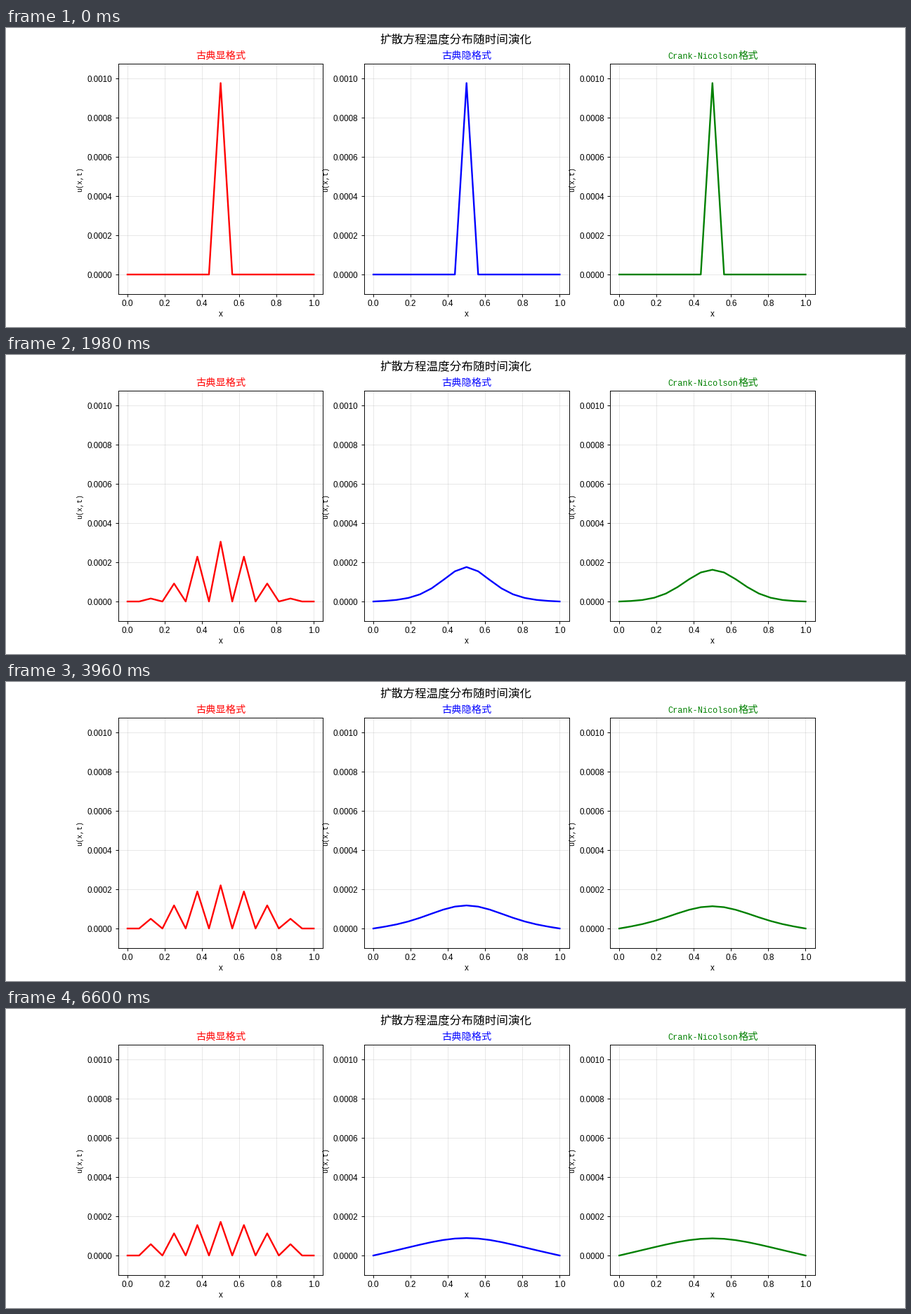
Animation, 1280 px wide and 427 px high, one loop 6930 ms. Source, as a matplotlib script:

```python
import numpy as np
import matplotlib.pyplot as plt
from matplotlib.animation import FuncAnimation

W, H, DPI = 1280, 427, 128
PT = 2 / 3                 # layout is designed for a 15 inch wide figure
STEPS, INTERVAL = 21, 330
N, R = 16, 0.5             # grid cells and mesh ratio
PEAK = 1 / 1024
CJK, SANS, MONO = "Noto Sans CJK JP", "Liberation Sans", "Liberation Mono"

plt.rcParams.update({
    "font.family": SANS,
    "axes.linewidth": 0.8 * PT,
    "grid.linewidth": 0.8 * PT,
    "xtick.labelsize": 10 * PT,
    "ytick.labelsize": 9.8 * PT,
})


def solve(theta):
    """Theta scheme for u_t = u_xx with zero boundary values."""
    m = N - 1
    lap = np.eye(m, k=1) + np.eye(m, k=-1) - 2 * np.eye(m)
    step = np.linalg.solve(np.eye(m) - theta * R * lap,
                           np.eye(m) + (1 - theta) * R * lap)
    u = np.zeros((STEPS, N + 1))
    u[0, N // 2] = PEAK
    for k in range(1, STEPS):
        u[k, 1:-1] = step @ u[k - 1, 1:-1]
    return u


def label(x, y, text, size, font=SANS, **kw):
    """Place text at pixel coordinates measured from the top left."""
    kw = {"ha": "center", "va": "baseline"} | kw
    fig.text(x / W, 1 - y / H, text, fontsize=size * PT, family=font, **kw)


fig, axes = plt.subplots(1, 3, figsize=(W / DPI, H / DPI), dpi=DPI)
fig.subplots_adjust(left=159.7 / W, right=1151.7 / W,
                    bottom=0.11, top=0.88, wspace=0.2)
label(W / 2, 21.5, "扩散方程温度分布随时间演化", 14, CJK)

x = np.linspace(0, 1, N + 1)
schemes = [("古典显格式", "red", 0), ("古典隐格式", "blue", 1),
           ("格式", "green", 0.5)]
curves = []
for ax, (title, color, theta) in zip(axes, schemes):
    u = solve(theta)
    line, = ax.plot(x, u[0], color=color, lw=2 * PT)
    curves.append((line, u))

    ax.set_xlim(-0.05, 1.05)
    ax.set_ylim(-0.0001, 1.1 * PEAK)
    ax.set_xticks(np.arange(6) / 5)
    ax.set_yticks(np.arange(6) / 5000)
    ax.xaxis.set_major_formatter("{x:.1f}")
    ax.yaxis.set_major_formatter("{x:.4f}")
    ax.tick_params(length=3.5 * PT, pad=3.5 * PT, width=0.8 * PT)
    ax.grid(True, alpha=0.3)

    box = ax.get_position()
    left, mid = box.x0 * W, (box.x0 + box.x1) / 2 * W
    if theta == 0.5:
        split = mid + 36.3
        label(split, 44.1, "Crank-Nicolson", 10, MONO, color=color, ha="right")
        label(split, 44.1, title, 12, CJK, color=color, ha="left")
    else:
        label(mid + 0.3, 44.1, title, 12, CJK, color=color)
    label(mid + 0.3, 411.5, "x", 9.8)
    label(left - 54.2, 216, "u(x,t)", 8.5, MONO, va="center", rotation=90)


def update(k):
    for line, u in curves:
        line.set_ydata(u[k])
    return [line for line, _ in curves]


anim = FuncAnimation(fig, update, frames=STEPS, interval=INTERVAL,
                     repeat=True, repeat_delay=0)
plt.show()
```
